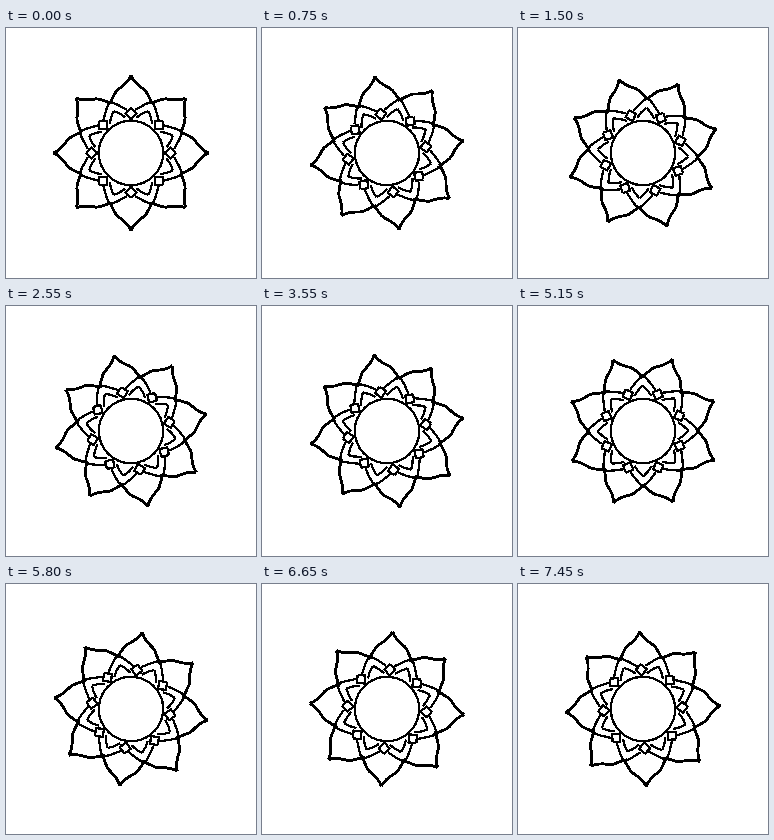
Recreate the animation shown at these times as an HTML page. Size 250 by 250 pixels, loop 7500 ms.

```html
<!DOCTYPE html>
<html lang="en">
<head>
<meta charset="utf-8">
<title>Turning flower</title>
<style>
  html, body { margin: 0; width: 100%; height: 100%; overflow: hidden; background: #fff; }
  svg { display: block; width: 100vw; height: 100vh; }
</style>
</head>
<body>
<svg viewBox="0 0 250 250" shape-rendering="crispEdges">
  <defs>
    <!-- right half of one petal, tip pointing up -->
    <g id="half">
      <path stroke-width="2.9" d="M0-77.5C3-70 8-67 13-63.5C17.5-60 17-55 22.5-48.5"/>
      <path d="M21.5-52Q13-48.5 4-43"/>
      <path d="M17.4-42Q11-40 5.5-35.5"/>
      <path d="M0-45L5.5-39.5L0-33.5"/>
    </g>
    <g id="petal">
      <use href="#half"/>
      <use href="#half" transform="scale(-1 1)"/>
    </g>
  </defs>
  <g id="flower" fill="none" stroke="#000" stroke-width="2.3" stroke-linejoin="round">
    <circle r="32.2"/>
  </g>
</svg>
<script>
  const LOOP = 7500, STEP = 50;
  const flower = document.getElementById('flower');

  for (let i = 0; i < 8; i++) {
    const petal = document.createElementNS('http://www.w3.org/2000/svg', 'use');
    petal.setAttribute('href', '#petal');
    petal.setAttribute('transform', `rotate(${i * 45})`);
    flower.append(petal);
  }

  function draw() {
    const time = Math.floor(performance.now() % LOOP / STEP) * STEP;
    flower.setAttribute('transform', `translate(125 125) rotate(${time / LOOP * 360})`);
    requestAnimationFrame(draw);
  }
  draw();
</script>
</body>
</html>
```
